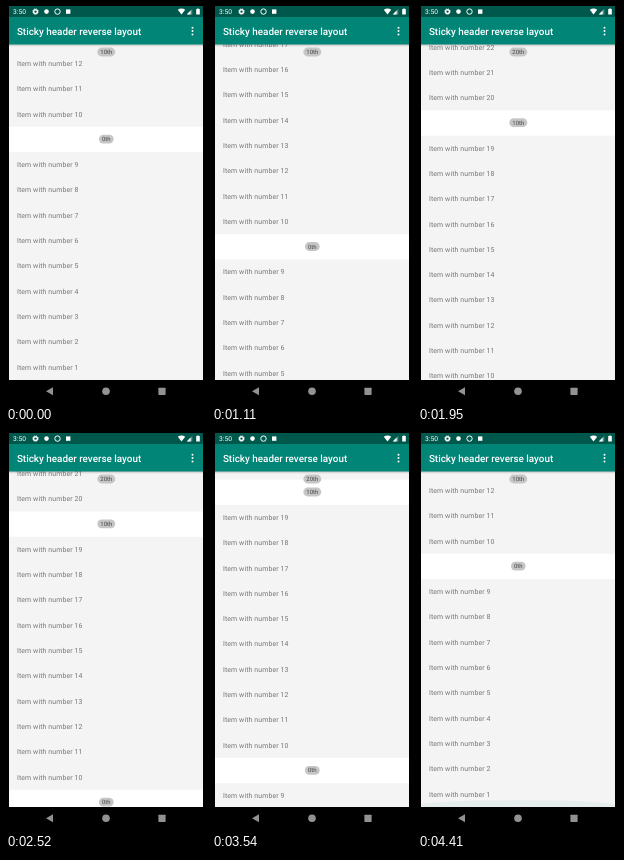
These frames come from a looping animation (200x399 px, 4710 ms). An HTML page:

```html
<!DOCTYPE html>
<html lang="en">
<head>
<meta charset="utf-8">
<title>Sticky header reverse layout</title>
<style>
  html, body { margin: 0; height: 100%; overflow: hidden; background: #000; }
  svg { display: block; width: 100%; height: 100%; }
  text { font-family: Roboto, sans-serif; text-rendering: geometricPrecision; }
  .item { font-size: 6.91px; letter-spacing: .0178em; fill: #757575; }
  .chip rect { fill: #c6c6c6; }
  .chip text { font-size: 5.93px; fill: #444; text-anchor: middle; }
  .title { font-size: 9.88px; font-weight: 500; fill: #fff; }
  .clock { font-size: 6.7px; fill: #fff; }
</style>
</head>
<body>
<svg viewBox="0 0 200 399">
  <defs>
    <clipPath id="view"><rect x="3" y="38" width="194" height="336"/></clipPath>
    <linearGradient id="shade" x2="0" y2="1">
      <stop stop-opacity=".22"/><stop offset="1" stop-opacity="0"/>
    </linearGradient>
  </defs>
  <rect width="200" height="399"/>
  <g clip-path="url(#view)">
    <rect x="3" y="38" width="194" height="336" fill="#f4f4f4"/>
    <g id="list"></g>
    <ellipse id="glow" cx="100" cy="375" rx="110" ry="8" fill="#008577" opacity="0"/>
    <g id="sticky"></g>
    <rect x="3" y="38" width="194" height="3" fill="url(#shade)"/>
  </g>

  <rect x="3" width="194" height="11" fill="#00574b"/>
  <rect x="3" y="11" width="194" height="27.5" fill="#008577"/>
  <text class="title" x="10.9" y="29">Sticky header reverse layout</text>
  <g fill="#fff">
    <circle cx="186.5" cy="21.8" r="1"/>
    <circle cx="186.5" cy="25.1" r="1"/>
    <circle cx="186.5" cy="28.4" r="1"/>
  </g>

  <text class="clock" x="7" y="8">3:50</text>
  <g fill="#fff">
    <circle cx="29.5" cy="5.6" r="1.9" fill="none" stroke="#fff" stroke-width="1.4"/>
    <circle cx="29.5" cy="5.6" r="2.8" fill="none" stroke="#fff" stroke-width=".8" stroke-dasharray="1.1"/>
    <circle cx="40.5" cy="5.6" r="2.3"/>
    <circle cx="51.5" cy="5.6" r="2.7" fill="none" stroke="#fff"/>
    <rect x="60" y="3.4" width="4.4" height="4.4"/>
    <path d="M171.8 3.8Q175.5 1 179.2 3.8L175.5 8.6Z"/>
    <path d="M180.8 8.4L186.3 2.8V8.4Z" fill-opacity=".35"/>
    <path d="M180.8 8.4L184.6 4.5V8.4Z"/>
    <path d="M190.2 3.1h1v-.7h1.6v.7h1v5.4h-3.6Z"/>
  </g>

  <g fill="#929292">
    <path d="M40 385.2L47 381.2V389.2Z"/>
    <circle cx="100" cy="385.2" r="3.8"/>
    <rect x="152.4" y="381.7" width="7.2" height="7.2" rx=".6"/>
  </g>
</svg>
<script>
const PITCH = 25.3, FIRST_Y = 361.1, ROWS = 32, LOOP = 4710, STEP = 30;
const list = document.getElementById('list');
const sticky = document.getElementById('sticky');
const glow = document.getElementById('glow');

// Scroll distance over time: [ms, px]
const keys = [
  [0, 0], [660, 0], [1110, 107.4], [1830, 269], [1950, 261.9], [2520, 236],
  [2610, 234], [2760, 234], [2940, 319.6], [3060, 338], [3540, 204.2],
  [3810, 170], [3930, 170], [4380, 0], [LOOP, 0]
];

const rate = i => (keys[i + 1][1] - keys[i][1]) / (keys[i + 1][0] - keys[i][0]);

// Harmonic mean keeps the curve free of overshoot
function slope(i) {
  if (i === 0 || i === keys.length - 1) return 0;
  const a = rate(i - 1), b = rate(i);
  return a * b > 0 ? 2 * a * b / (a + b) : 0;
}

function scrollAt(t) {
  let i = 0;
  while (t >= keys[i + 1][0]) i++;
  const [t0, s0] = keys[i], [t1, s1] = keys[i + 1];
  const d = t1 - t0, u = (t - t0) / d, v = 1 - u;
  return s0 * (1 + 2 * u) * v * v + s1 * u * u * (3 - 2 * u)
    + d * u * v * (slope(i) * v - slope(i + 1) * u);
}

const groupOf = row => Math.floor((row + 1) / 11);

function chip(group, y) {
  const w = group ? 18 : 14.8;
  return `<g class="chip"><rect x="${100.3 - w / 2}" y="${y - 4.4}" width="${w}" height="8.8" rx="4.4"/>
    <text x="100.3" y="${y + 2.1}">${group * 10}th</text></g>`;
}

function rowMarkup(row) {
  const y = FIRST_Y - PITCH * row, group = groupOf(row);
  if ((row + 1) % 11 === 10) {
    return `<rect x="3" y="${y - PITCH / 2}" width="194" height="${PITCH}" fill="#fff"/>`
      + chip(group, y - .3);
  }
  return `<text class="item" x="10.9" y="${y + 2.4}">Item with number ${row + 1 - group}</text>`;
}

list.innerHTML = Array.from({ length: ROWS }, (_, row) => rowMarkup(row)).join('');

let shown = -1;
function draw(now) {
  const t = Math.floor(now % LOOP / STEP) * STEP;
  const s = scrollAt(t);
  list.setAttribute('transform', `translate(0 ${s})`);
  const topRow = Math.floor((FIRST_Y + PITCH / 2 + s - 39) / PITCH);
  const group = groupOf(topRow);
  if (group !== shown) sticky.innerHTML = chip(shown = group, 46);
  glow.setAttribute('opacity', t >= 4380 ? .06 : 0);
}

const start = performance.now();
function tick() {
  draw(performance.now() - start);
  requestAnimationFrame(tick);
}
tick();
</script>
</body>
</html>
```
